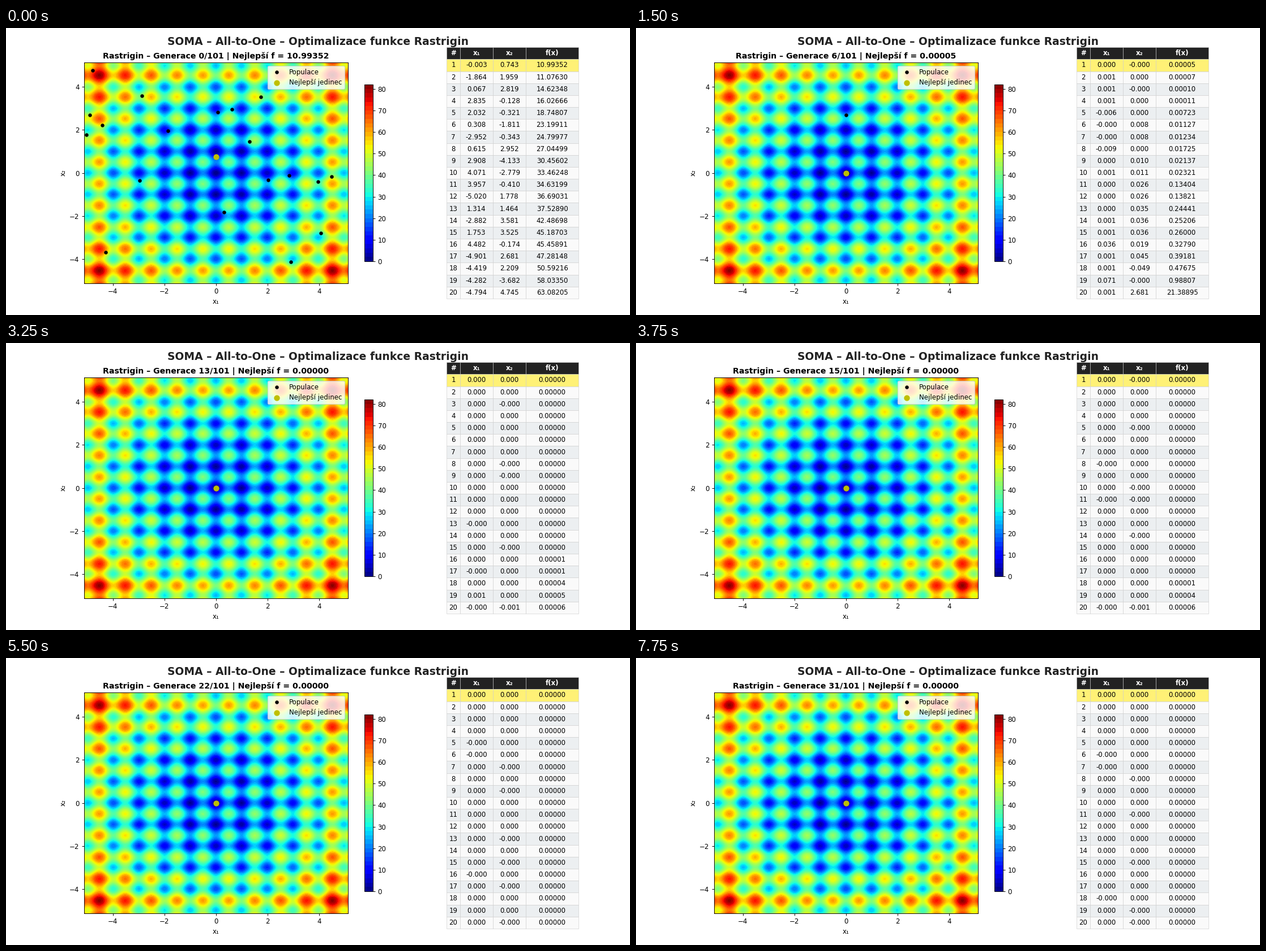
A matplotlib script that plays this animation: 1102 by 508 pixels, repeating every 8 s.

```python
import numpy as np
import matplotlib.pyplot as plt
from matplotlib.animation import FuncAnimation

GENS, INTERVAL, TOTAL = 32, 250, 101
BOUND = 5.12
PATH, STEP, PRT = 3.0, 0.11, 0.4
DARK = "#222222"

START = np.array([
    (-0.003, 0.743), (-1.864, 1.959), (0.067, 2.819), (2.835, -0.128),
    (2.032, -0.321), (0.308, -1.811), (-2.952, -0.343), (0.615, 2.952),
    (2.908, -4.133), (4.071, -2.779), (3.957, -0.410), (-5.020, 1.778),
    (1.314, 1.464), (-2.882, 3.581), (1.753, 3.525), (4.482, -0.174),
    (-4.901, 2.681), (-4.419, 2.209), (-4.282, -3.682), (-4.794, 4.745),
])


def rastrigin(x, y):
    return (20 + x**2 - 10 * np.cos(2 * np.pi * x)
            + y**2 - 10 * np.cos(2 * np.pi * y))


def cost(points):
    return rastrigin(points[..., 0], points[..., 1])


def migrate(pop, rng):
    """Everyone jumps along a path to the leader and keeps the best stop."""
    leader = pop[cost(pop).argmin()]
    mask = rng.random_sample(pop.shape) < PRT
    t = np.arange(0, PATH, STEP)[:, None, None]
    stops = np.clip(pop + t * (leader - pop) * mask, -BOUND, BOUND)
    return stops[cost(stops).argmin(axis=0), np.arange(len(pop))]


def evolve():
    rng = np.random.RandomState(42)
    history = [START]
    while len(history) < GENS:
        history.append(migrate(history[-1], rng))
    return [pop[cost(pop).argsort(kind="stable")] for pop in history]


HISTORY = evolve()

fig, (ax, side) = plt.subplots(
    1, 2, figsize=(13.011, 5.998), dpi=84.7,
    gridspec_kw={"width_ratios": [3, 1]})
fig.suptitle("SOMA – All-to-One – Optimalizace funkce Rastrigin",
             fontsize=16, fontweight="bold", color=DARK, y=0.97)

axis = np.linspace(-BOUND, BOUND, 200)
X, Y = np.meshgrid(axis, axis)
field = ax.contourf(X, Y, rastrigin(X, Y), levels=50, cmap="jet")
fig.colorbar(field, ax=ax, shrink=0.8)
dots = ax.scatter([], [], c="black", s=20, label="Populace", zorder=3)
best = ax.scatter([], [], c="y", s=60, label="Nejlepší jedinec", zorder=4)
ax.set(xlim=(-BOUND, BOUND), ylim=(-BOUND, BOUND), xlabel="x₁", ylabel="x₂")
ax.legend(loc="upper right")

side.axis("off")
table = side.table(
    cellText=[[str(i + 1), "", "", ""] for i in range(len(START))],
    colLabels=["#", "x₁", "x₂", "f(x)"], colWidths=[0.1, 0.25, 0.25, 0.4],
    cellLoc="center", loc="center")
table.auto_set_font_size(False)
table.set_fontsize(10)
table.scale(1.2, 1.5)
for (row, _), cell in table.get_celld().items():
    cell.set_edgecolor("#cccccc")
    cell.set_linewidth(0.5)
    if row == 0:
        cell.set_facecolor(DARK)
        cell.set_text_props(color="white", weight="bold")
    elif row == 1:
        cell.set_facecolor("#fff176")
    else:
        cell.set_facecolor("#eceff1" if row % 2 else "#fafafa")


def update(gen):
    pop = HISTORY[gen]
    values = cost(pop)
    dots.set_offsets(pop)
    best.set_offsets(pop[:1])
    ax.set_title(f"Rastrigin – Generace {gen}/{TOTAL} | "
                 f"Nejlepší f = {values[0]:.5f}",
                 fontsize=12, fontweight="bold")
    for row, ((x, y), f) in enumerate(zip(pop, values), 1):
        for col, text in enumerate((f"{x:.3f}", f"{y:.3f}", f"{f:.5f}"), 1):
            table[row, col].get_text().set_text(text)
    return dots, best


anim = FuncAnimation(fig, update, frames=GENS, interval=INTERVAL,
                     repeat=True, repeat_delay=0, blit=False)
plt.show()
```
